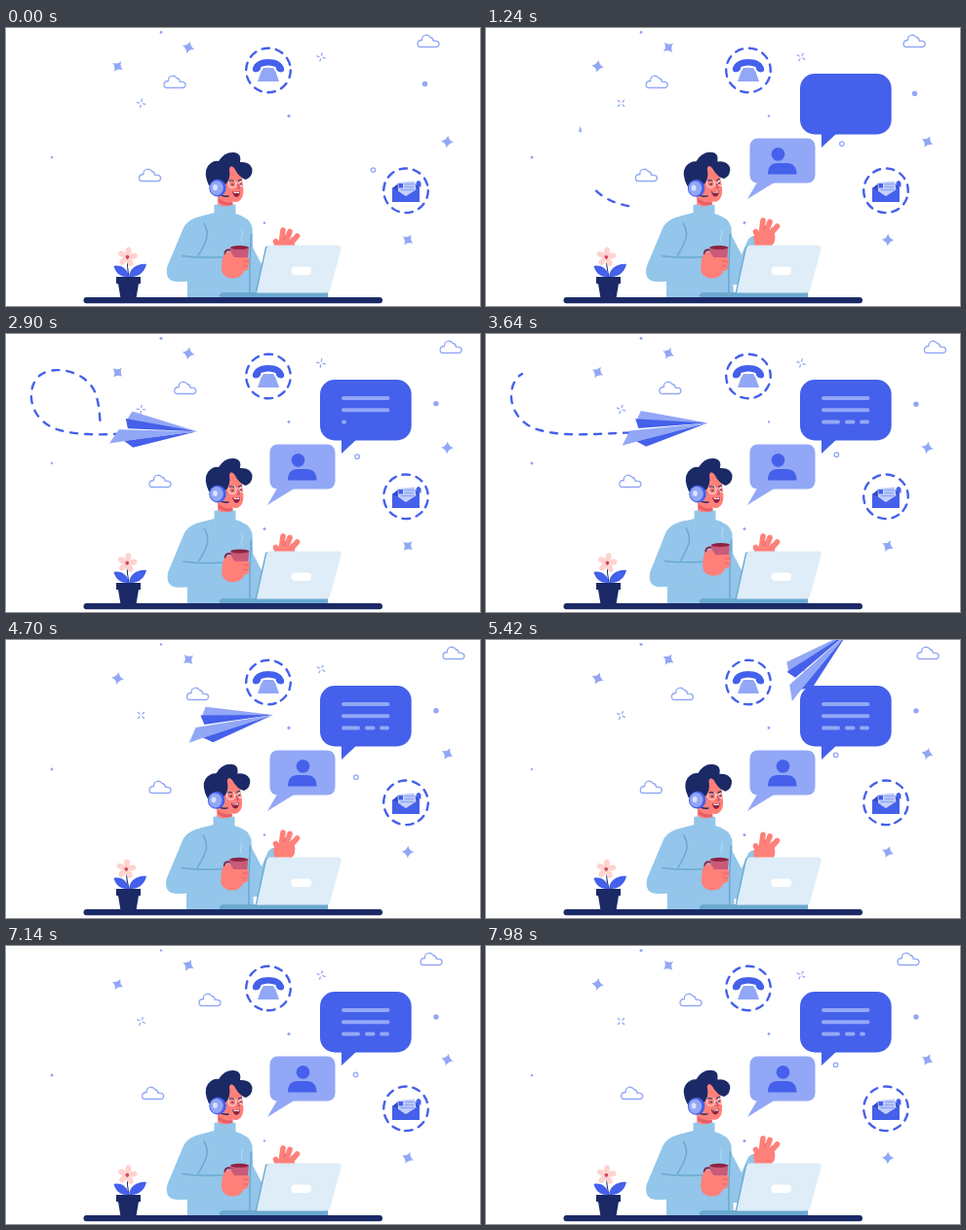
These frames come from a looping animation (486 px wide and 286 px high, 8 s). An HTML page:

```html
<!DOCTYPE html>
<html lang="en">
<head>
<meta charset="utf-8">
<title>Support desk</title>
<style>
html, body { margin: 0; width: 100%; height: 100%; overflow: hidden; background: #fff; }
svg { display: block; width: 100vw; height: 100vh; }
.blue { fill: #4560ea; } .pale { fill: #92a7f6; } .navy { fill: #1b2a66; }
.skin { fill: #ff8079; } .wool { fill: #93c6ea; } .shade { fill: #6ba9d0; }
.fold { fill: none; stroke: #6ba9d0; stroke-width: 1.5; stroke-linecap: round; }
.dash { fill: none; stroke: #4560ea; stroke-width: 2.4; stroke-linecap: round; }
.thin { fill: none; stroke: #92a7f6; stroke-width: 1.3; stroke-linecap: round; stroke-linejoin: round; }
.row { stroke: #92a7f6; stroke-width: 4; stroke-linecap: round; }
</style>
</head>
<body>
<svg viewBox="0 0 486 286">
  <defs>
    <path id="star" class="pale" d="M0-6.5Q1.3-1.3 6.5 0Q1.3 1.3 0 6.5Q-1.3 1.3-6.5 0Q-1.3-1.3 0-6.5Z"/>
    <path id="spark" class="thin" d="M0-2V-4.3M0 2V4.3M-2 0H-4.3M2 0H4.3"/>
    <path id="cloud" class="thin" d="M-8 6H8.5A3 3 0 0 0 9 .2Q6.5-.8 5.3 0Q5-3.5 2-4Q0-7-3.5-6Q-7-5-6.5-1Q-11-1-11 3Q-11 6-8 6Z"/>
  </defs>
  <g id="sky"></g>

  <g>
    <circle class="dash" id="ring1" cx="269" cy="43.5" r="22.8" stroke-dasharray="7.5 6.826"/>
    <path class="pale" d="M264 41H274L276.5 45L280 55H258L261.5 45Z"/>
    <path class="blue" d="M253 41C255 35 261 32 269 32S283 35 285 41Q286 45 282 45.5Q277 45 276.5 40Q269 37 261.5 40Q261 45 256 45.5Q252 45 253 41Z"/>
  </g>
  <g>
    <circle class="dash" id="ring2" cx="410" cy="167.3" r="22.8" stroke-dasharray="7.5 6.826"/>
    <path fill="#3148c2" d="M396 165L402 160H419L424 164V170H396Z"/>
    <path fill="#c5d0fb" d="M401.5 159L419 157.5L421 168L410 173L402 168Z"/>
    <path class="blue" d="M402.500 160H407V164.500H402.500Z"/>
    <path class="thin" d="M409 160.500H418M409 163.500H418M405 166.500H418"/>
    <path class="blue" d="M396 164L410 173L424 164V179H396ZM420.5 159Q423 155 425.5 159V163.5H420.5Z"/>
  </g>

  <g id="chat" class="blue">
    <rect x="322" y="47" width="93.7" height="62.5" rx="15"/>
    <path d="M344 108V123L360 108Z"/>
    <g id="rows"></g>
  </g>
  <g id="user">
    <g class="pale">
      <rect x="270.5" y="113.5" width="67" height="46" rx="8"/>
      <path d="M278.5 158L268 176L297 158Z"/>
    </g>
    <path class="blue" d="M289 150.5Q289 139 299 139H308Q318.5 139 318.5 150.5Z"/>
    <circle class="blue" id="avatar" cy="129.8" r="6.9"/>
  </g>
  <circle id="hoop" class="thin" r="2.2"/>

  <polyline id="trail" class="dash" stroke-dasharray="7 8"/>

  <g id="flower">
    <path d="M124.500 236Q124 246 126 257" fill="none" stroke="#1b2a66"/>
    <g id="petals" fill="#ffd3cf"></g>
    <circle cx="124.5" cy="235.5" r="1.9" fill="#d9475f"/>
  </g>
  <path class="blue" d="M126 256C117 257 112 251 110.5 245C118 243 125 248 126 256C127 247 135 242 144 243C142 251 136 257 126 256Z"/>
  <path class="navy" d="M113 256H138V263H136L133.5 278H117.5L115 263H113Z"/>

  <g id="wave">
    <path class="wool" d="M250 210L262 233L269 217Q275 211 280 216L274 264H250Z"/>
    <path class="skin" d="M274 215Q284 206 296 212Q298 224 288 226H276Z"/>
    <path d="M280 217L276.500 209.500M282 213L284 198M286 213L291 199.500M290 214L298.500 204" fill="none" stroke="#ff8079" stroke-width="5.6" stroke-linecap="round"/>
    <path d="M286.500 203L285 208M293.500 205L291 209" stroke="#d9586a" stroke-width=".7"/>
  </g>

  <g id="torso">
    <path class="wool" d="M213.500 182Q224 179 235.500 182V191Q250 195 252.500 205L255 278H186V240L183 215Q188 197 202 193L213.500 190Z"/>
    <path class="fold" d="M251.500 212Q249.500 240 250 274"/>
  </g>

  <g id="head">
    <path class="skin" d="M217 166H232V181Q224 186 217 181Z"/>
    <path fill="#e55f68" d="M218 175Q225 181 232.5 179V182Q224 184 218 179Z"/>
    <path class="skin" d="M220 145Q232 137 241 147L243 162Q245 176 237 179Q226 180 220 171Z"/>
    <path class="navy" d="M208 162Q202 149 207 142Q212 136 218 137Q224 127 234 128Q242 129 240 138Q250 137 252.5 145Q253 153 246 156Q239 154 234 144Q230 140 229 145Q231 156 224 162Z"/>
    <g fill="none" stroke="#fff" stroke-width=".8">
      <circle cx="232" cy="160.5" r="4"/><circle cx="243" cy="160" r="3.3"/><path d="M236 160H239.5"/>
    </g>
    <path d="M229 157.5Q231 156 234 157.5M238 157L242 156M231 161H233.5M239.5 160.5H241.5" fill="none" stroke="#1b2a66" stroke-width="1.2"/>
    <path d="M237.5 160L239.5 165H237" fill="none" stroke="#c9475d"/>
    <path fill="#8d2344" d="M232 168Q236 170 240 167.5Q240 174 236 174Q233 173 232 168Z"/>
    <path fill="#fff" d="M233 168.6Q236 170 239.5 168.2L239 170H234Z"/>
    <path d="M219 171Q223 174 228 173" fill="none" stroke="#1b2a66" stroke-width="1.5" stroke-linecap="round"/>
    <ellipse class="blue" cx="217" cy="164.5" rx="8.8" ry="9"/>
    <ellipse class="pale" cx="216" cy="164.5" rx="6.8" ry="7.5"/>
    <ellipse cx="214.5" cy="164" rx="2.4" ry="3" fill="#d9e2ff"/>
  </g>

  <g id="arm">
    <path class="wool" d="M203 193Q185 196 181 208L165.500 245Q162 260 175 261L226 260L224 235L198 236L206 213Q207 201 203 193Z"/>
    <path class="fold" d="M203 201Q209 211 204 221Q201 228 197 234M181 234.500Q200 237 223 235.500"/>
    <g id="cup">
      <path d="M231 228.500Q224 227 224.500 233Q225 237 230 237" fill="none" stroke="#8d2344" stroke-width="2"/>
      <path fill="#c95a78" d="M230 225.5H249L247.5 243H232Z"/>
      <ellipse cx="239.5" cy="225.8" rx="9.5" ry="2" fill="#8d2344"/>
      <path class="skin" d="M222 237Q225 229 231 231L234 236H246Q251 236 249 240Q251 243 248 245Q251 249 244 250Q241 258 231 257.5Q220 256 221 245Z"/>
      <path d="M243 240H249M243 245H248" stroke="#d9586a" stroke-width=".8"/>
      <path d="M242 220Q240 216 242 213T241 208" fill="none" stroke="#bfe0f5" stroke-width=".8"/>
    </g>
  </g>

  <path class="shade" d="M222 272H330V277H219Q218 273 222 272Z"/>
  <path class="shade" d="M266 225L269 224L260 273H255.5Z"/>
  <path fill="#deedf8" d="M271 223.5H340Q344.5 223.5 343.5 228L332 270Q331 272.5 328 272.5H257L267 227Q268 223.5 271 223.5Z"/>
  <rect x="292.5" y="245.5" width="20.5" height="8.5" rx="4" fill="#fff"/>
  <rect class="navy" x="79.5" y="277" width="306.5" height="6.3" rx="3"/>

  <g id="plane">
    <g transform="rotate(7)">
      <path class="pale" d="M-24-20L44-5L-29-10Z"/>
      <path class="blue" d="M-30-12L44-5L-27-2Z"/>
      <path class="blue" d="M-30 11L-20 17L44-5Z"/>
      <path class="pale" d="M-36 0L44-5L-30 11.5L-44.5 15Z"/>
    </g>
  </g>
</svg>
<script>
const LOOP = 8000, CYCLE = 3400, TAU = 2 * Math.PI, NS = 'http://www.w3.org/2000/svg';
const $ = id => document.getElementById(id);

function add(parent, tag, attrs) {
  const el = document.createElementNS(NS, tag);
  for (const k in attrs) el.setAttribute(k, attrs[k]);
  parent.appendChild(el);
  return el;
}
const set = (el, value) => el.setAttribute('transform', value);

// Motion rules
const clamp = u => Math.max(0, Math.min(1, u));
function ease(t, from, to) {
  const u = clamp((t - from) / (to - from));
  return u * u * (3 - 2 * u);
}
function pop(t, start) {
  const u = clamp((t - start) / 500) - 1;
  return 1 + 2.2 * u ** 3 + 1.2 * u ** 2;
}
const wave = (t, mid, size, period) => mid - size * Math.cos(TAU * t / period);
const settle = (t, from, to, span) => to + (from - to) * Math.exp(-t / span);

const sky = $('sky');
const icon = name => add(sky, 'use', { href: '#' + name });

const clouds = [
  { y: 55.5, mid: 191.5, size: 18.5, period: 2 * LOOP },
  { y: 151.5, mid: 159, size: 11.5, period: 3800 },
  { y: 13.5, mid: 447, size: 14, period: LOOP }
].map(c => ({ ...c, el: icon('cloud') }));

const spinners = [
  ['star', 114.5, 39.5, 25, 17],
  ['star', 187, 20, 30, -20],
  ['star', 452.5, 117, 15, -12],
  ['star', 412, 218, 22, 20],
  ['spark', 138.5, 77.5, 25, -20],
  ['spark', 323, 30, 20, -10]
].map(([name, x, y, mid, swing]) => ({ el: icon(name), x, y, mid, swing }));

const dots = [[159, 4.5], [290, 90.5], [47, 133], [265, 200.5]]
  .map(([cx, cy]) => add(sky, 'circle', { cx, cy, class: 'pale' }));
const ball = add(sky, 'circle', { r: 2.7, class: 'pale' });

for (let a = 10; a < 360; a += 72)
  add($('petals'), 'ellipse', { cx: 124.5, cy: 229.5, rx: 3, ry: 4.3, transform: `rotate(${a} 124.5 235.5)` });

// Message lines are written one after another and wiped in reverse order
const whole = [[346, 391.5]], broken = [[346, 361], [370, 376.5], [385, 391]];
const rows = [whole, whole, broken].map((parts, i) => {
  const y = 66 + 12.2 * i;
  return parts.map(([a, b]) => ({ a, b, el: add($('rows'), 'line', { class: 'row', x1: a, y1: y, y2: y }) }));
});
function drawRows(t) {
  const step = 650;
  rows.forEach((parts, i) => {
    const start = 1500 + step * i, end = 7850 + step * (2 - i);
    const edge = 344 + 48 * (ease(t, start, start + step) - ease(t, end, end + step));
    for (const { a, b, el } of parts) {
      el.style.display = edge > a ? '' : 'none';
      el.setAttribute('x2', Math.min(b, edge));
    }
  });
}

const route = document.createElementNS(NS, 'path');
route.setAttribute('d', 'M176 185C150 186 110 182 100 145C94 118 100 85 92 62C84 38 48 30 33 44C20 58 24 88 52 98C80 107 118 102 150 101.5C165 101 174 99.5 184 98C200 95.5 216 89.5 230 86.5C300 72 370 10 400-70');
const TAKEOFF = 1150, TRAIL_END = 418;
const planeSize = t => ease(t, 1050, 2150);
// Glides to a near stop, then rushes off
const planeAt = t => settle(t - TAKEOFF, 100, 475, 950) + 30 * Math.max(0, t / 1000 - 3.7) ** 3;

function drawTrail(t) {
  const from = 15.5 * (t / 1000) ** 2.13;
  const to = Math.min(TRAIL_END, planeAt(t) - 70 * (1 - planeSize(t)));
  const pts = [];
  for (let s = from; s < to; s += 2) {
    const p = route.getPointAtLength(s);
    pts.push(p.x.toFixed(2) + ',' + p.y.toFixed(2));
  }
  $('trail').setAttribute('points', pts.join(' '));
  $('trail').setAttribute('stroke-dashoffset', from);
}

function drawPlane(t) {
  const flying = t > TAKEOFF && t < 5750;
  $('plane').style.display = flying ? '' : 'none';
  if (!flying) return;
  const s = planeAt(t), p = route.getPointAtLength(s);
  const a = route.getPointAtLength(s - 4), b = route.getPointAtLength(s + 4);
  const angle = Math.atan2(b.y - a.y, b.x - a.x) * 360 / TAU;
  set($('plane'), `translate(${p.x} ${p.y}) rotate(${angle}) scale(${planeSize(t)})`);
}

function drawSky(t) {
  for (const c of clouds) set(c.el, `translate(${wave(t, c.mid, c.size, c.period)} ${c.y})`);
  const turn = Math.cos(TAU * (t / CYCLE + 0.14));
  for (const s of spinners) set(s.el, `translate(${s.x} ${s.y}) rotate(${s.mid + s.swing * turn})`);
  dots.forEach((d, i) => d.setAttribute('r', 1.4 + 0.25 * Math.sin(t / 400 + i * 2)));
  set(ball, `translate(${settle(t, 429.5, 441, 600)} ${settle(t, 57.5, 73, 1200)})`);
  set($('hoop'), `translate(${settle(t, 376.5, 358.5, 1200)} ${wave(t, 132, -14, 2200)})`);
  set($('ring1'), `rotate(${t * 0.015} 269 43.5)`);
  set($('ring2'), `rotate(${t * 0.015} 410 167.3)`);
}

function drawPerson(t) {
  const p = t / CYCLE % 1, rise = ease(p, 0.1, 0.33);
  const lean = rise - ease(p, 0.45, 0.66);
  const hand = rise - ease(p, 0.5, 0.8);
  const lift = ease(t, 2600, 3500) - ease(t, 3800, 4500);
  set($('head'), `translate(${-0.5 * lean} 0) rotate(${-2.5 * lean} 225 185)`);
  set($('torso'), `translate(${-lean} 0)`);
  set($('arm'), `translate(${2.5 * lift - 0.7 * lean} ${-lift}) rotate(${-lift} 190 225)`);
  set($('cup'), `translate(${-1.5 * lift} ${-7 * lift})`);
  set($('wave'), `translate(0 ${10 * (1 - hand)})`);
  set($('flower'), `rotate(${wave(t, -2, -2, CYCLE)} 126 256)`);
}

const grow = (id, x, y, k) => set($(id), `translate(${x} ${y}) scale(${k}) translate(${-x} ${-y})`);

function draw(t) {
  drawSky(t);
  grow('user', 268, 176, pop(t, 250));
  grow('chat', 344, 123, pop(t, 600));
  $('avatar').setAttribute('cx', 299.5 + 5 * ease(t, 3640, 4700));
  drawRows(t);
  drawPerson(t);
  drawTrail(t);
  drawPlane(t);
}

const begin = performance.now();
function tick() {
  draw((performance.now() - begin) % LOOP);
  requestAnimationFrame(tick);
}
tick();
</script>
</body>
</html>
```
